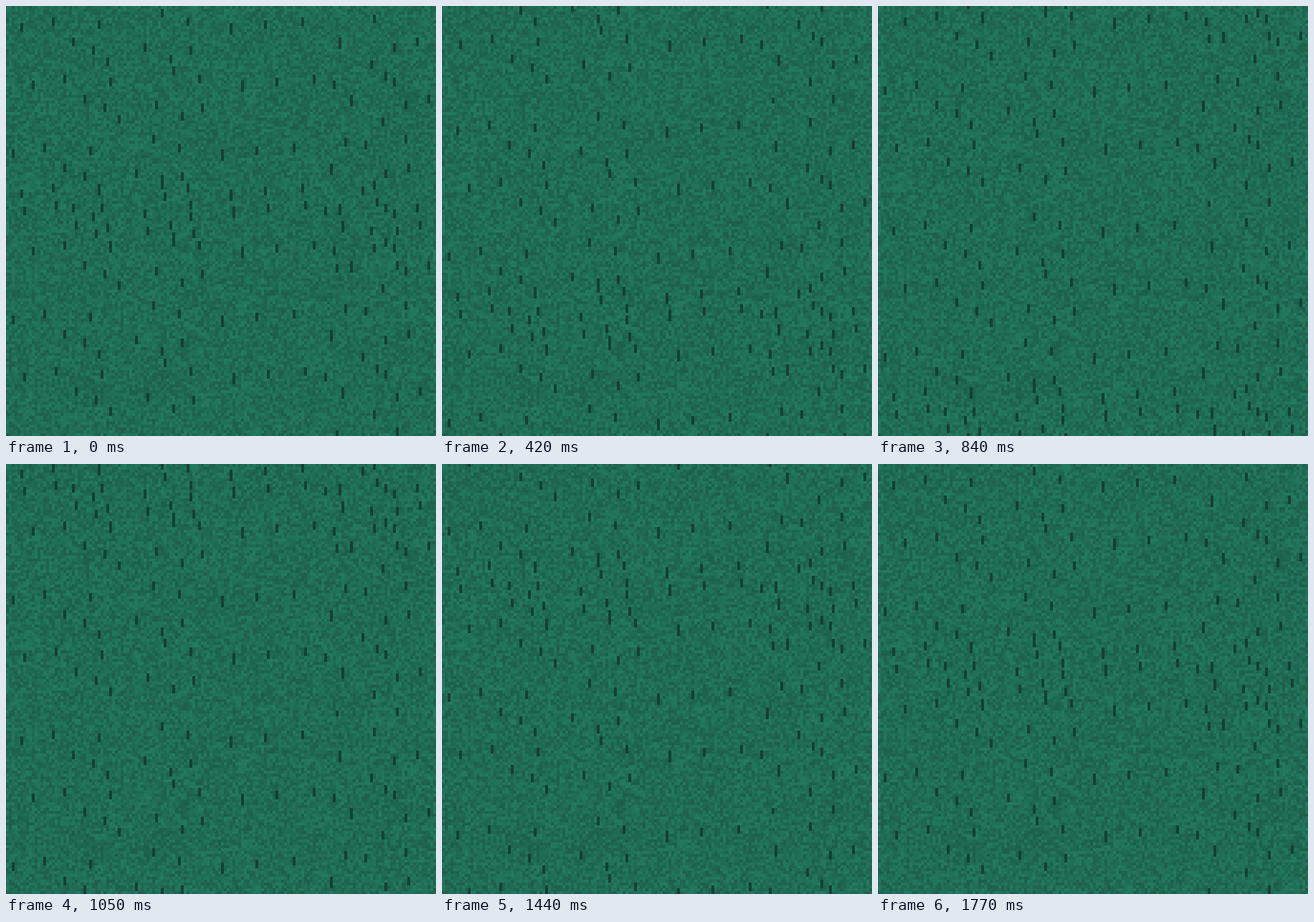
Animation, 600 px wide and 600 px high, one loop 1.8 s. Source, as an HTML page with a canvas:

```html
<!DOCTYPE html>
<html lang="en">
<head>
<meta charset="utf-8">
<title>Green rain</title>
<style>
html, body { margin: 0; width: 100%; height: 100%; overflow: hidden; background: #206b56; }
canvas { display: block; width: 600px; height: 600px; }
</style>
</head>
<body>
<canvas id="stage" width="600" height="600"></canvas>
<script>
const CELL = 4, GRID = 150, SIZE = CELL * GRID;
const STEP = 30, STEPS = 60;
const ctx = document.getElementById("stage").getContext("2d");

// One cluster of drops: column, top row and, for long drops, the length in cells
const cluster = [
  [54, 1], [128, 3], [16, 4], [63, 4], [103, 4], [32, 5], [90, 5],
  [5, 6], [78, 6, 4], [23, 11], [116, 11, 4], [143, 11], [48, 13],
  [135, 13], [30, 14], [64, 14], [57, 17], [35, 18], [127, 19],
  [135, 25], [114, 26]
];
// Each shift doubles the drops
const shifts = [[4, 20], [-3, 44], [0, 58]];
const drops = shifts.reduce(
  (all, [dx, dy]) => all.concat(all.map(([x, y, h]) => [x + dx, y + dy, h])),
  cluster
);

function layer(paint) {
  const c = document.createElement("canvas");
  c.width = c.height = SIZE;
  paint(c.getContext("2d"));
  return c;
}

function seeded(seed) {
  return () => {
    seed = (seed + 0x6d2b79f5) | 0;
    let n = Math.imul(seed ^ (seed >>> 15), seed | 1);
    n ^= n + Math.imul(n ^ (n >>> 7), n | 61);
    return ((n ^ (n >>> 14)) >>> 0) / 4294967296;
  };
}

const ground = layer(g => {
  const rand = seeded(4127);
  for (let y = 0; y < GRID; y++) {
    for (let x = 0; x < GRID; x++) {
      const k = 0.77 + 0.23 * rand();
      g.fillStyle = `rgb(${36 * k}, ${122 * k}, ${97 * k})`;
      g.fillRect(x * CELL, y * CELL, CELL, CELL);
    }
  }
});

const rain = layer(g => {
  g.fillStyle = "#144035";
  for (const [x, y, h = 3] of drops) g.fillRect(x * CELL, y * CELL, CELL, h * CELL);
});

// One sheet of rain leaves below while the next enters above, two cells behind
function draw(now) {
  const p = Math.floor(now / STEP) % STEPS / (STEPS - 1);
  const leaving = Math.round(GRID * p);
  const entering = Math.round((GRID + 2) * (p - 1));
  ctx.drawImage(ground, 0, 0);
  ctx.drawImage(rain, 0, leaving * CELL);
  ctx.drawImage(rain, 0, entering * CELL);
}

const start = performance.now();
function tick() {
  draw(performance.now() - start);
  requestAnimationFrame(tick);
}
tick();
</script>
</body>
</html>
```
